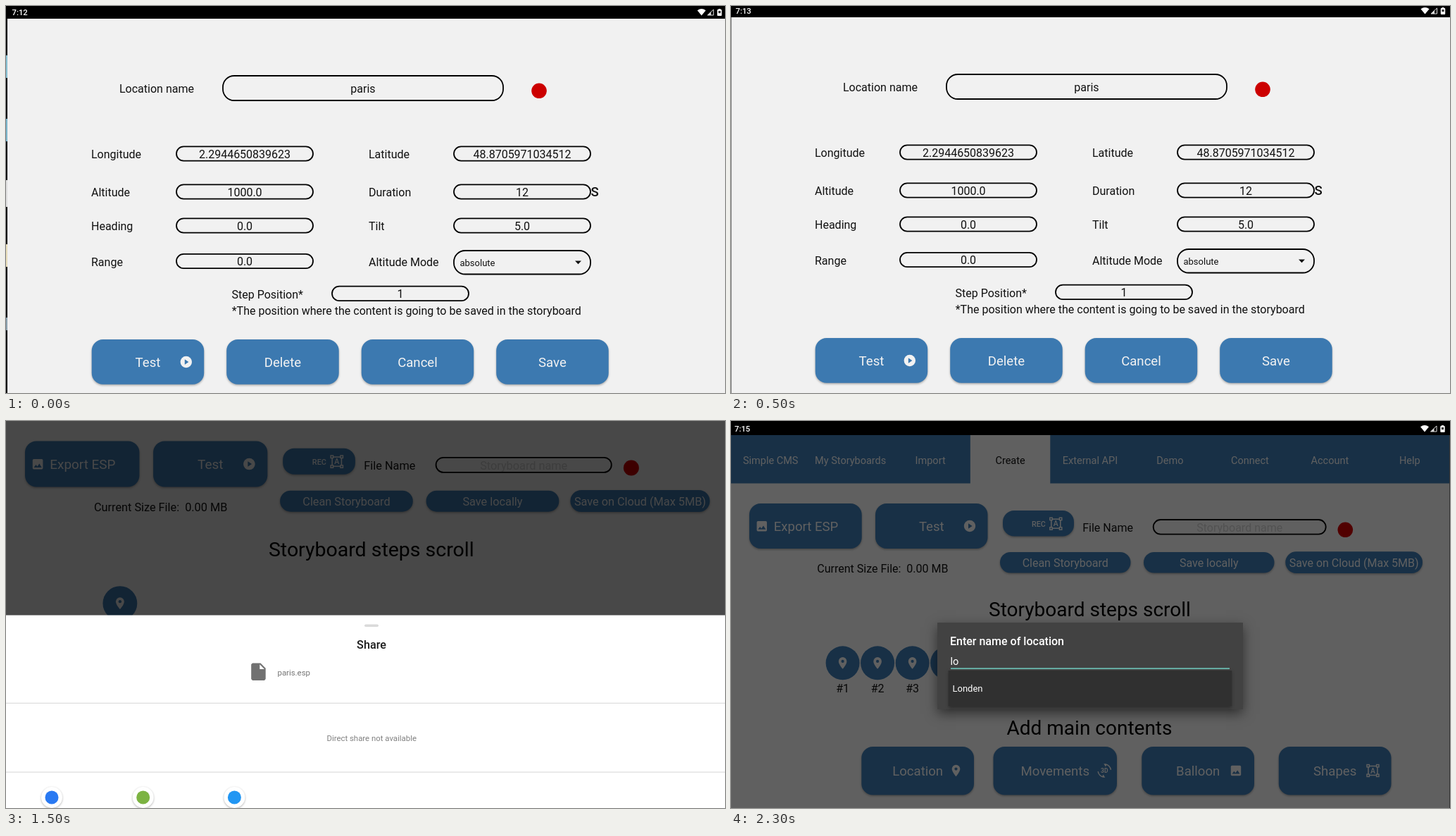
An HTML page with a canvas for the animation above (2.5 s loop, 1021x549 px).

```html
<!DOCTYPE html>
<html lang="en">
<head>
<meta charset="utf-8">
<title>Storyboard editor</title>
<style>
html, body { margin: 0; width: 100%; height: 100%; overflow: hidden; background: #f1f1f1; }
canvas { display: block; width: 1021px; height: 549px; }
</style>
</head>
<body>
<canvas id="stage" width="1021" height="549"></canvas>
<script>
const W = 1021, H = 549, STEP = 500;
const BLUE = '#3c79b0', BG = '#f1f1f1', INK = '#111', PALE = '#f2f2f2', RED = '#cc0000';
const ctx = document.getElementById('stage').getContext('2d');

function rect(x, y, w, h, fill) {
  ctx.fillStyle = fill;
  ctx.fillRect(x, y, w, h);
}

function disc(x, y, r, fill) {
  ctx.fillStyle = fill;
  ctx.beginPath();
  ctx.arc(x, y, r, 0, Math.PI * 2);
  ctx.fill();
}

function poly(points, fill) {
  ctx.fillStyle = fill;
  ctx.beginPath();
  points.forEach(([x, y]) => ctx.lineTo(x, y));
  ctx.closePath();
  ctx.fill();
}

function roundPath(x, y, w, h, r) {
  ctx.beginPath();
  ctx.roundRect(x, y, w, h, r);
}

// y is the middle of the capital letters
function text(str, x, y, size = 16, { color = INK, align = 'left', weight = 400 } = {}) {
  ctx.font = `${weight} ${size}px Roboto, sans-serif`;
  ctx.textAlign = align;
  ctx.fillStyle = color;
  ctx.fillText(str, x, y + size * 0.355);
}

function centered(str, x, y, size, color, weight) {
  text(str, x, y, size, { color, weight, align: 'center' });
}

function shadowed(blur, dy, alpha, draw) {
  ctx.save();
  ctx.shadowColor = `rgba(0,0,0,${alpha})`;
  ctx.shadowBlur = blur;
  ctx.shadowOffsetY = dy;
  draw();
  ctx.restore();
}

function button(x, y, w, h, label, size = 18.6, cx = x + w / 2) {
  shadowed(3, 1.5, 0.3, () => {
    roundPath(x, y, w, h, Math.min(16, h / 2));
    ctx.fillStyle = BLUE;
    ctx.fill();
  });
  centered(label, cx, y + h / 2 + 0.5, size, PALE);
}

function field(x, y, w, h, value, color = INK) {
  roundPath(x, y, w, h, Math.min(16, h / 2));
  ctx.strokeStyle = '#000';
  ctx.lineWidth = 1.8;
  ctx.stroke();
  if (value) centered(value, x + w / 2, y + h / 2 + 0.8, 16, color);
}

function playIcon(x, y) {
  disc(x, y, 8.2, PALE);
  poly([[x - 2, y - 3.7], [x + 3.6, y], [x - 2, y + 3.7]], BLUE);
}

function imageIcon(x, y) {
  roundPath(x - 7.2, y - 7.2, 14.4, 14.4, 1.7);
  ctx.fillStyle = PALE;
  ctx.fill();
  poly([[x - 5.5, y + 4.6], [x - 2.6, y + 0.8], [x - 0.6, y + 3.2], [x + 2.2, y - 0.6], [x + 5.6, y + 4.6]], BLUE);
}

function pinIcon(x, y) {
  ctx.fillStyle = PALE;
  ctx.beginPath();
  ctx.arc(x, y - 2.4, 5.8, Math.PI, 0);
  ctx.bezierCurveTo(x + 5.8, y + 2, x, y + 8.3, x, y + 8.3);
  ctx.bezierCurveTo(x, y + 8.3, x - 5.8, y + 2, x - 5.8, y - 2.4);
  ctx.fill();
  disc(x, y - 2.4, 2.1, BLUE);
}

function shapesIcon(x, y) {
  ctx.strokeStyle = PALE;
  ctx.lineWidth = 1.5;
  ctx.strokeRect(x - 6.5, y - 6.5, 13, 13);
  for (const sx of [-1, 1]) for (const sy of [-1, 1]) {
    const cx = x + sx * 6.8, cy = y + sy * 6.8;
    rect(cx - 2.4, cy - 2.4, 4.8, 4.8, PALE);
    rect(cx - 1, cy - 1, 2, 2, BLUE);
  }
  centered('A', x, y, 10.5, PALE, 500);
}

function spinIcon(x, y) {
  ctx.strokeStyle = PALE;
  ctx.lineWidth = 1.4;
  for (const start of [-Math.PI / 2, Math.PI / 2]) {
    ctx.beginPath();
    ctx.arc(x, y, 9.2, start + 0.1, start + 1.45);
    ctx.stroke();
  }
  poly([[x - 1, y - 10], [x + 3.6, y - 9], [x + 1.6, y - 5.6]], PALE);
  poly([[x + 1, y + 10], [x - 3.6, y + 9], [x - 1.6, y + 5.6]], PALE);
  centered('3D', x, y + 0.2, 8.5, PALE, 700);
}

function statusBar(h, clock, x, right) {
  const y = h - 9;
  rect(0, 0, W, h, '#000');
  text(clock, x, y, 11.3, { color: '#fff', weight: 500 });

  ctx.fillStyle = '#fff';
  ctx.beginPath();
  ctx.moveTo(right, y + 4.5);
  ctx.lineTo(right - 6, y - 2.8);
  ctx.quadraticCurveTo(right, y - 7, right + 6, y - 2.8);
  ctx.fill();

  const s = right + 17;
  ctx.strokeStyle = '#ddd';
  ctx.lineWidth = 1;
  ctx.beginPath();
  ctx.moveTo(s, y - 4);
  ctx.lineTo(s, y + 4);
  ctx.lineTo(s - 8.5, y + 4);
  ctx.closePath();
  ctx.stroke();
  poly([[s - 8.5, y + 4], [s - 3.5, y - 0.8], [s - 3.5, y + 4]], '#ddd');

  const b = right + 25.5;
  rect(b - 1.5, y - 5, 3, 2, '#fff');
  roundPath(b - 3.2, y - 4, 6.4, 9, 1);
  ctx.fillStyle = '#fff';
  ctx.fill();
  rect(b - 1.6, y - 2, 3.2, 3.2, '#333');
}

function formPage() {
  text('Location name', 161, 117.5);
  field(308, 99, 398, 35, 'paris');
  disc(757, 120.3, 10.8, RED);

  const rows = [
    [209.5, 'Longitude', '2.2944650839623', 'Latitude', '48.8705971034512'],
    [263.5, 'Altitude', '1000.0', 'Duration', '12'],
    [311.5, 'Heading', '0.0', 'Tilt', '5.0'],
    [362, 'Range', '0.0', 'Altitude Mode', '']
  ];
  for (const [y, left, a, right, b] of rows) {
    text(left, 121, y + 1);
    field(242, y - 10.2, 194, 20.4, a);
    text(right, 515, y + 1);
    if (b) field(636, y - 10.2, 194, 20.4, b);
  }
  text('S', 830.5, 263.5, 18.6, { weight: 500 });
  field(636, 347, 194, 33.5);
  text('absolute', 644.5, 364, 13);
  poly([[808, 361.5], [817, 361.5], [812.5, 366.2]], INK);

  text('Step Position*', 320.5, 409);
  field(463, 397.7, 194, 20.4, '1');
  text('*The position where the content is going to be saved in the storyboard', 320.7, 432);

  ['Test', 'Delete', 'Cancel', 'Save'].forEach((label, i) =>
    button(121.7 + i * 191.5, 473, 159.5, 63.7, label));
  playIcon(255.8, 505);
}

function tabBar() {
  const names = ['Simple CMS', 'My Storyboards', 'Import', 'Create', 'External API', 'Demo', 'Connect', 'Account', 'Help'];
  const w = W / names.length;
  rect(0, 18, W, 68.5, BLUE);
  names.forEach((name, i) => {
    const on = name === 'Create';
    if (on) rect(i * w - 0.5, 18, w, 69, BG);
    centered(name, (i + 0.5) * w - 0.5, 53.5, 14.5, on ? INK : PALE);
  });
}

function createPage(steps) {
  tabBar();
  button(26, 115, 159.7, 64, 'Export ESP', 18.6, 106.5);
  imageIcon(43.8, 147.2);
  button(205, 115, 159.5, 64, 'Test');
  playIcon(339, 147);
  button(386, 125, 101, 36.5, '');
  centered('REC', 436.8, 144, 10.7, PALE, 500);
  shapesIcon(461.3, 143.7);

  text('File Name', 499.2, 149);
  field(599.7, 138, 245, 20.6, 'Storyboard name', '#cbcbcb');
  disc(872.3, 152.3, 10.8, RED);
  text('Current Size File:  0.00 MB', 122.3, 207);
  button(382, 184, 185.5, 29.5, 'Clean Storyboard', 16);
  button(586, 184, 185.5, 29.5, 'Save locally', 16);
  button(787.3, 183.3, 194.7, 30.6, 'Save on Cloud (Max 5MB)', 16);

  centered('Storyboard steps scroll', 509.5, 265.5, 28, '#000');
  for (let i = 0; i < steps; i++) {
    const x = 158.6 + i * 49.5;
    disc(x, 341.3, 24, BLUE);
    pinIcon(x, 341.3);
    centered('#' + (i + 1), x, 377, 16, INK);
  }

  centered('Add main contents', 509, 433.5, 28, '#000');
  button(185.3, 460, 159.7, 68.5, 'Location');
  pinIcon(319.5, 494);
  button(372.5, 460, 175.5, 68.5, 'Movements');
  spinIcon(530.3, 494);
  button(583.3, 460, 159.7, 68.5, 'Balloon');
  imageIcon(717, 494);
  button(777.8, 460, 159.7, 68.5, 'Shapes');
  shapesIcon(911.5, 494);
}

function dim(alpha) {
  rect(0, 0, W, H, `rgba(0,0,0,${alpha})`);
}

function shifted(dx, dy, scale, draw) {
  ctx.save();
  ctx.translate(dx, dy);
  ctx.scale(scale, scale);
  draw();
  ctx.restore();
}

function exportMenu() {
  shadowed(14, 6, 0.4, () => rect(26.3, 179, 156.3, 115, '#303030'));
  ['Zoom To', 'Orbit', 'Spiral'].forEach((item, i) =>
    text(item, 38.8, 198.5 + i * 38.3, 13, { color: '#fff' }));
}

function shareSheet() {
  rect(0, 275.5, W, H, '#fff');
  roundPath(509, 288.5, 20, 3.5, 1.7);
  ctx.fillStyle = '#dadada';
  ctx.fill();
  centered('Share', 519, 317, 16.2, '#1c1c1c', 500);

  poly([[350, 343.5], [361.5, 343.5], [368.7, 350.7], [368.7, 366], [367, 368], [350, 368], [348.2, 366], [348.2, 345.3]], '#717171');
  poly([[360.3, 345.3], [366.9, 351.9], [360.3, 351.9]], '#fff');
  text('paris.esp', 385.5, 357, 11.4, { color: '#757575' });
  rect(0, 399.7, W, 1.2, '#dcdcdc');
  centered('Direct share not available', 519.2, 449.5, 11.4, '#808080');
  rect(0, 497.5, W, 1.2, '#dcdcdc');

  ['#2979f2', '#7cb342', '#2196f3'].forEach((color, i) => {
    const x = 65 + i * 129.7;
    shadowed(3, 1, 0.3, () => disc(x, 534, 15, '#fff'));
    disc(x, 534, 9.5, color);
  });
}

function nameDialog() {
  shadowed(16, 6, 0.5, () => rect(293, 286, 434, 123, '#424242'));
  text('Enter name of location', 311, 312, 16, { color: '#fff', weight: 500 });
  text('lo', 311.5, 340.5, 14.6, { color: '#fff' });
  rect(312, 350.3, 396, 1.8, '#6cbdb3');
  shadowed(5, 2, 0.35, () => rect(308.7, 354, 402.5, 50.5, '#303030'));
  text('Londen', 314.5, 379.5, 13, { color: '#fff' });
}

function edgeStrip() {
  rect(0, 18, 2, H, '#111');
  [[70, 32, '#86bfd0'], [160, 32, '#79b4c9'], [247, 38, '#ddd'], [338, 32, '#e6dcb8'], [442, 18, '#8aa0ad']]
    .forEach(([y, h, color]) => rect(0, y, 2, h, color));
}

const scenes = [
  () => {
    formPage();
    statusBar(18, '7:12', 8.5, 987.7);
    edgeStrip();
  },
  () => {
    shifted(-2, -2, 1, formPage);
    statusBar(16, '7:13', 6.5, 985.5);
    rect(0, 16, 1, H, '#8c8c8c');
  },
  () => {
    createPage(1);
    exportMenu();
    statusBar(18, '7:13', 5, 985);
    rect(1020, 18, 1, H, '#777');
  },
  () => {
    shifted(0.55, -88.5, 1.0172, () => createPage(1));
    dim(0.7);
    shareSheet();
  },
  () => {
    shifted(0, 2, 1, () => createPage(4));
    dim(0.6);
    nameDialog();
    statusBar(20, '7:15', 5, 985);
    rect(1020, 20, 1, H, '#333');
  }
];

const start = performance.now();

function tick() {
  const t = performance.now() - start;
  rect(0, 0, W, H, BG);
  scenes[Math.floor(t / STEP) % scenes.length]();
  requestAnimationFrame(tick);
}
tick();
</script>
</body>
</html>
```
